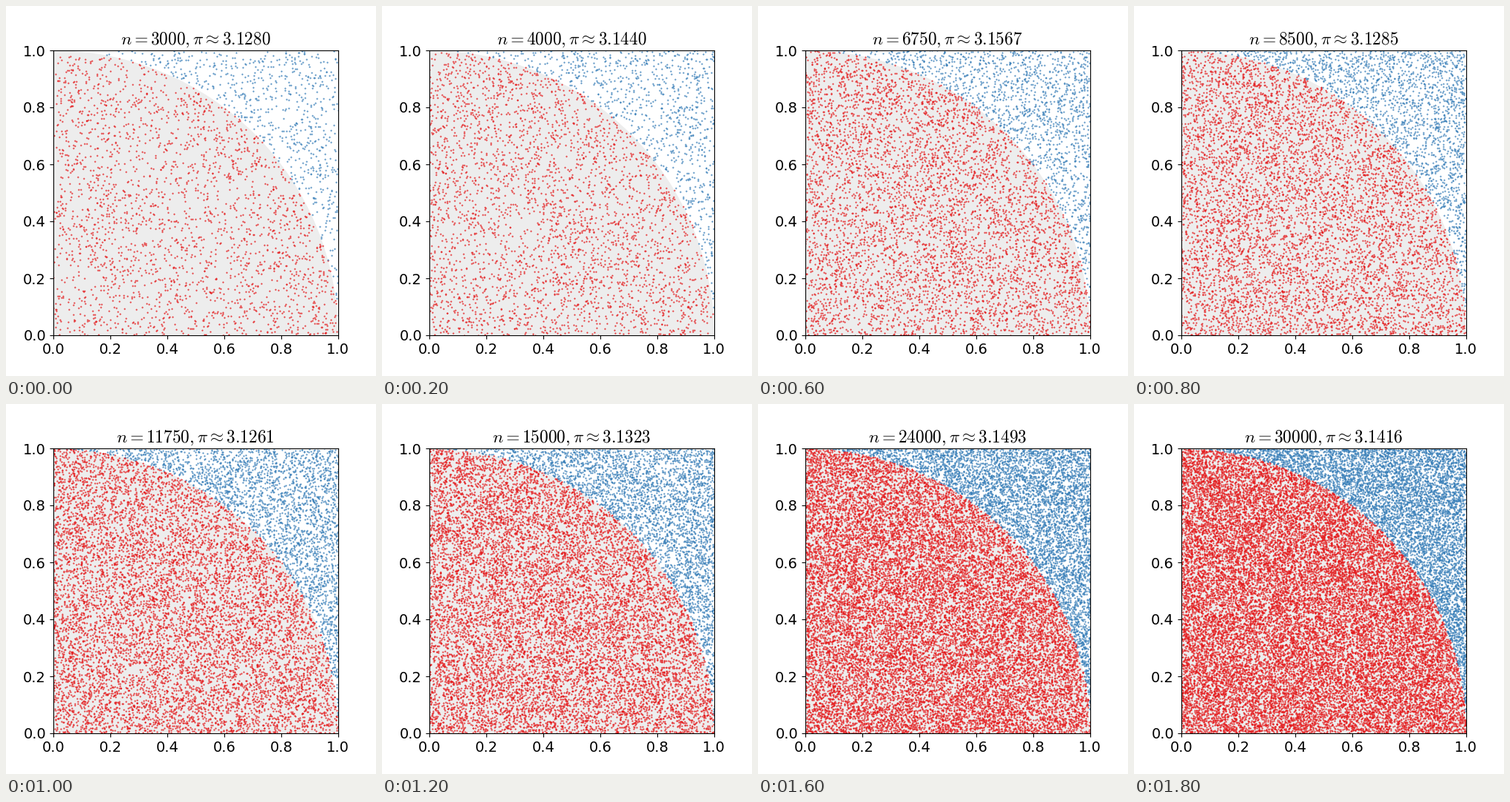
A matplotlib script that plays this animation: 500x500 px, repeating every 2 s.

```python
import matplotlib.pyplot as plt
import numpy as np
from matplotlib.animation import FuncAnimation
from matplotlib.patches import Wedge

plt.rcParams.update({
    "font.family": "DejaVu Sans",
    "font.size": 14,
    "mathtext.fontset": "cm",
})

RED, BLUE, GREY = "#e41a1c", "#377eb8", "#ededed"
FRAMES = 10


def sample_size(step):
    """Grow the sample along straight lines between a few sizes."""
    return int(np.interp(step, [0, 2, 4, 6, 7, 9],
                         [3000, 5000, 8500, 15000, 18000, 30000]))


def sample(n):
    """Split fresh uniform points into those inside and outside the arc."""
    points = np.random.default_rng(n).random((n, 2))
    inside = np.hypot(points[:, 0], points[:, 1]) <= 1
    return points[inside], points[~inside]


def add_dots(color):
    dots, = ax.plot([], [], linestyle="none", marker=".", color=color,
                    markersize=1, markeredgewidth=1)
    return dots


fig, ax = plt.subplots(figsize=(5, 5), dpi=100)
ax.set_aspect("equal")
ax.set_xlim(0, 1)
ax.set_ylim(0, 1)
ax.add_patch(Wedge((0, 0), 1, 0, 90, facecolor=GREY, edgecolor="none"))

red_dots = add_dots(RED)
blue_dots = add_dots(BLUE)
title = ax.set_title("")


def update(step):
    n = sample_size(step)
    inside, outside = sample(n)
    red_dots.set_data(inside.T)
    blue_dots.set_data(outside.T)
    estimate = 4 * len(inside) / n
    title.set_text(rf"$n = {n}, \pi \approx {estimate:.4f}$")
    return red_dots, blue_dots, title


anim = FuncAnimation(fig, update, frames=FRAMES, interval=200, repeat=True)
plt.show()
```
